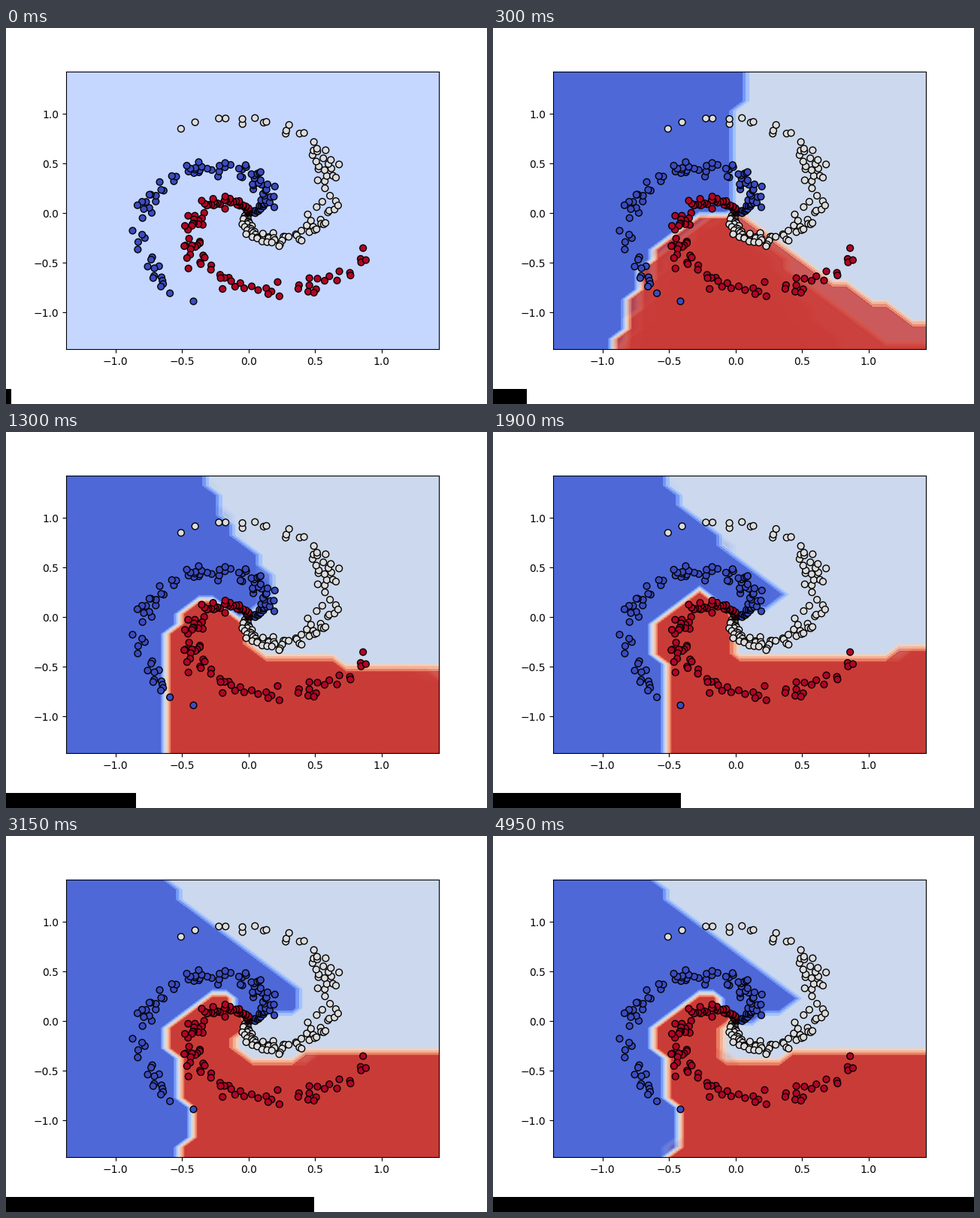
A matplotlib script that plays this animation: 640x500 px, repeating every 5 s.

```python
import math

import numpy as np
import matplotlib.pyplot as plt
from matplotlib.animation import FuncAnimation
from matplotlib.patches import Rectangle
from matplotlib.path import Path

W, H, DPI = 640, 500, 100
FRAMES, INTERVAL = 100, 50
POINTS = 100                 # points per spiral arm
CELLS, STEP = 28, 0.1        # grid on which the classes are predicted
LEFT, BOTTOM = -1.3705, -1.371
TRAIL = 4                    # translucent predictions that still show through

# Key points of the class borders, in grid cells, at a few training steps.
# All borders start at the junction: blue/grey runs to the top edge,
# red/grey to the right edge and blue/red to the bottom edge.
JUNCTION = (13.4, 13.6)
STAGES = {
    1: ([(14.5, 28)],
        [(16, -8)],
        [(7, 0)]),
    6: ([(13.5, 23.8), (14.4, 25.5), (14.4, 28)],
        [(19.5, 7.9), (24, 5), (28, 2.2)],
        [(11, 13.5), (7.5, 10.3), (5.5, 4), (4.5, 0)]),
    17: ([(14.5, 20), (13.5, 21), (12.5, 26), (12, 28)],
         [(13.5, 11.5), (15.5, 9.8), (22, 8.4), (28, 6.3)],
         [(11, 15.3), (9.5, 14.4), (7.5, 12), (7.5, 0)]),
    38: ([(15.9, 14.5), (17.3, 16), (9.5, 25), (8.4, 28)],
         [(13.5, 9.5), (24, 9.5), (28, 10.7)],
         [(11, 16.6), (7.5, 13), (7.5, 10), (8.5, 9), (8.5, 0)]),
    99: ([(17, 14.4), (18.5, 16), (17, 17.5), (9.5, 24.5), (7.75, 28)],
         [(12.5, 12.5), (12.5, 10.5), (13.5, 9.5), (17, 9.5), (18, 10.5),
          (28, 10.5)],
         [(12.2, 16.4), (10.5, 16.4), (7.5, 13), (7.5, 11), (8.5, 10),
          (8.5, 6), (9.5, 5), (9.5, 2), (8.5, 0)]),
}


def resample(line, count=150):
    """Points at even distances along a polyline."""
    pts = np.array([JUNCTION] + line, float)
    dist = np.r_[0, np.cumsum(np.hypot(*np.diff(pts, axis=0).T))]
    at = np.linspace(0, dist[-1], count)
    return np.c_[np.interp(at, dist, pts[:, 0]), np.interp(at, dist, pts[:, 1])]


KEYS = list(STAGES)
BORDERS = {k: [resample(line) for line in STAGES[k]] for k in KEYS}
cells = np.arange(CELLS + 1)
gx, gy = np.meshgrid(cells, cells)
GRID = np.c_[gx.ravel(), gy.ravel()]


def borders(n):
    b = next(k for k in KEYS[1:] if n <= k)
    a = KEYS[KEYS.index(b) - 1]
    u = (n - a) / (b - a)
    if b == KEYS[-1]:
        u = 1 - (1 - u) ** 2     # the training settles
    return [(1 - u) * p + u * q for p, q in zip(BORDERS[a], BORDERS[b])]


def inside(*parts):
    return Path(np.vstack(parts)).contains_points(GRID)


def predict(n):
    """Class 0, 1 or 2 at every grid node."""
    top, right, low = borders(n)
    end = CELLS + 1
    blue = inside([(-1, end), (top[-1, 0], end)], top[::-1], low,
                  [(low[-1, 0], -1), (-1, -1)])
    red = inside([(low[-1, 0], -1)], low[::-1], right,
                 [(end, right[-1, 1]), (end, -1.5)])
    z = np.ones(len(GRID))
    z[red] = 2
    z[blue] = 0
    return z.reshape(gx.shape)


def spiral():
    """Three noisy arms, each turning by four radians."""
    rng = np.random.RandomState(0)
    r = np.linspace(0, 1, POINTS)
    arms = []
    for k in range(3):
        t = 4 * (k + r) + 0.2 * rng.randn(POINTS)
        arms.append(np.c_[r * np.cos(t), r * np.sin(t)])
    return np.vstack(arms), np.repeat([0, 1, 2], POINTS)


fig = plt.figure(figsize=(W / DPI, H / DPI), dpi=DPI, facecolor="white")
ax = fig.add_axes([80 / W, 72.8 / H, 496 / W, 369.6 / H])
ax.set_facecolor("#c5d6ff")

xs, ys = LEFT + STEP * cells, BOTTOM + STEP * cells
layers = [ax.contourf(xs, ys, predict(n), levels=np.linspace(0, 2, 9),
                      cmap="coolwarm", alpha=0.8)
          for n in range(1, FRAMES)]

xy, label = spiral()
ax.scatter(xy[:, 0], xy[:, 1], c=label, s=40, cmap="coolwarm",
           edgecolors="black", zorder=2)
ax.set_xlim(xs[0], xs[-1])
ax.set_ylim(ys[0], ys[-1])
ticks = np.linspace(-1, 1, 5)
ax.set_xticks(ticks)
ax.set_yticks(ticks)

bar = Rectangle((0, 0), 0, 20 / H, color="black", lw=0, antialiased=False,
                transform=fig.transFigure)
fig.add_artist(bar)


def draw(n):
    for k, layer in enumerate(layers, 1):
        layer.set_visible(n - TRAIL < k <= n)
    bar.set_width(math.ceil(W * (n + 1) / FRAMES) / W)
    return [bar]


anim = FuncAnimation(fig, draw, frames=FRAMES, interval=INTERVAL,
                     repeat=True, repeat_delay=0, blit=False)
plt.show()
```
